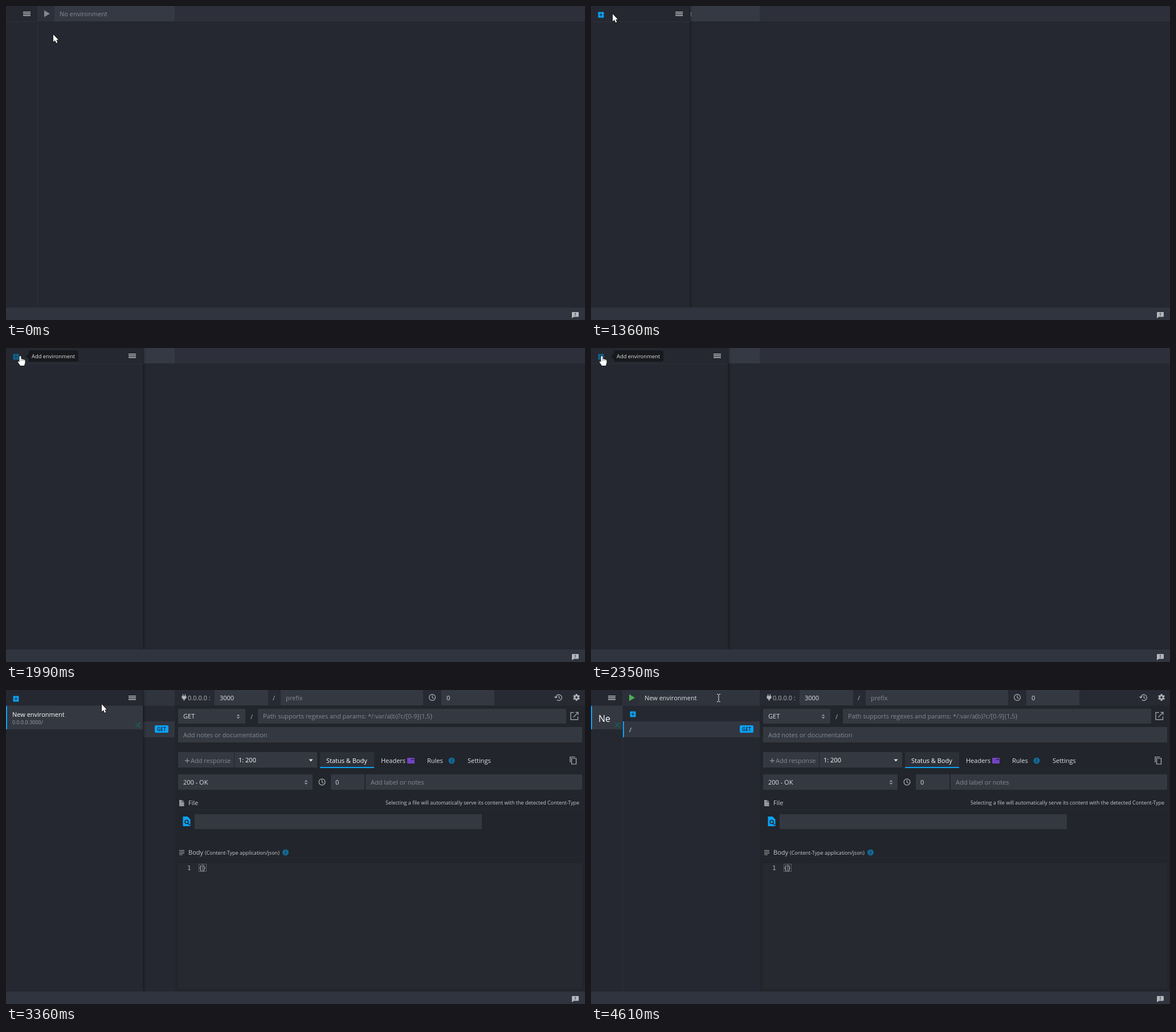
Recreate the animation shown at these times as an HTML page with a canvas. Size 1016 px wide and 551 px high, loop 5.33 s.

```html
<!DOCTYPE html>
<html lang="en">
<head>
<meta charset="utf-8">
<title>Adding an environment</title>
<style>
html, body { margin: 0; width: 100%; height: 100%; overflow: hidden; background: #252830; }
canvas { display: block; }
</style>
</head>
<body>
<canvas id="stage" width="1016" height="551"></canvas>
<script>
const g = document.getElementById('stage').getContext('2d');
const LOOP = 5330, CREATED = 2640;
const BG = '#252830', MAIN = '#22252b', FIELD = '#343841', BLUE = '#0aa2f5', DIM = '#0d6495',
  LIGHT = '#e0e2e6', MUTED = '#858a94', ICON = '#b4b7bc', LINE = '#2e313a';

const clamp = v => Math.max(0, Math.min(1, v));
const ease = v => v < .5 ? 2 * v * v : 1 - 2 * (1 - v) ** 2;

function rect(x, y, w, h, color) {
  g.fillStyle = color;
  g.fillRect(x, y, w, h);
}
function round(x, y, w, h, r, color) {
  g.fillStyle = color;
  g.beginPath();
  g.roundRect(x, y, w, h, r);
  g.fill();
}
// y is the middle of the capital letters
function text(s, x, y, color = LIGHT, size = 11, weight = 400, family = '"Open Sans", "Noto Sans", sans-serif') {
  g.font = `${weight} ${size}px ${family}`;
  g.fillStyle = color;
  g.fillText(s, x, Math.round(y + size * .36));
}
function fillPath(d, x, y, color) {
  g.save();
  g.translate(x, y);
  g.fillStyle = color;
  g.fill(new Path2D(d));
  g.restore();
}
function strokePath(d, x, y, color = ICON, width = 1.2) {
  g.save();
  g.translate(x, y);
  g.strokeStyle = color;
  g.lineWidth = width;
  g.stroke(new Path2D(d));
  g.restore();
}
function circle(x, y, r, color) {
  g.fillStyle = color;
  g.beginPath();
  g.arc(x, y, r, 0, 7);
  g.fill();
}

function plus(x, y, color) {
  round(x - 5, y - 5, 10, 10, 1, color);
  rect(x - 3, y - .5, 6, 1, BG);
  rect(x - .5, y - 3, 1, 6, BG);
}
function burger(x) {
  for (const y of [10, 13, 16]) rect(x - 6, y, 13, 1.4, '#c9cbcf');
}
function clock(x, y) {
  strokePath('M5.4 0A5.4 5.4 0 1 1 -5.4 0A5.4 5.4 0 1 1 5.4 0M0 -3.5V.3L2.6 2', x, y);
}
function info(x, y) {
  circle(x, y, 5.5, '#126a97');
  rect(x - .6, y - 3, 1.2, 1.3, MAIN);
  rect(x - .6, y - 1, 1.2, 4, MAIN);
}
function sorter(x, y) {
  fillPath('M-3 -1L0 -4L3 -1ZM-3 1L0 4L3 1Z', x, y, '#8f939b');
}
function gear(x, y) {
  g.save();
  g.translate(x, y);
  for (let i = 0; i < 6; i++) {
    g.rotate(Math.PI / 3);
    rect(-1.5, -6, 3, 4, ICON);
  }
  circle(0, 0, 4.3, ICON);
  circle(0, 0, 1.9, '#272a32');
  g.restore();
}
function page(x, y, color) {
  fillPath('M-4 -5.5H1.5L4.5 -2.5V5.5H-4Z', x, y, color);
  strokePath('M1.2 -5.5V-2H4.5', x, y, MAIN, .8);
}

function footer() {
  rect(0, 529, 1016, 22, '#30343e');
  round(993, 537, 12, 8.5, 1, ICON);
  fillPath('M0 0H4L0 3Z', 993, 545, ICON);
  rect(998.4, 538.5, 1.2, 3.2, '#30343e');
  rect(998.4, 542.6, 1.2, 1.2, '#30343e');
}

function topBar(created) {
  rect(56, 0, 960, 27, '#2d303b');
  if (created) rect(296, 0, 720, 27, '#272a32');
  fillPath('M-5 -6L5 0L-5 6Z', 72, 13.5, created ? '#4caf50' : '#83868e');
  rect(85, 0, 211, 27, created ? '#30343d' : '#353943');
  text(created ? 'New environment' : 'No environment', 94, 14, created ? LIGHT : MUTED);
}

function routes() {
  rect(56, 27, 240, 1, LINE);
  plus(73.5, 42.5, BLUE);
  rect(56, 55, 240, 28, '#323640');
  rect(56, 55, 2, 28, BLUE);
  text('/', 67, 70);
  round(261, 62, 24, 13, 2, BLUE);
  text('GET', 265, 68.5, '#14202a', 8.5, 600);
}

function content() {
  rect(296, 27, 720, 502, MAIN);

  fillPath('M-2.6 -5.5H-1.2V-2.5H1.2V-5.5H2.6V-2.5H4V0Q4 2.5 1 3V5.5H-1V3Q-4 2.5 -4 0V-2.5H-2.6Z', 312.5, 13, ICON);
  text('0.0.0.0 :', 319, 14, ICON);
  for (const [x, w] of [[366, 94], [482, 250], [764, 93]]) rect(x, 0, w, 27, FIELD);
  text('3000', 375, 14);
  text('/', 468, 14, ICON);
  text('prefix', 491, 14, MUTED);
  clock(748, 13);
  text('0', 773, 14);
  strokePath('M-4.6 0A5.2 5.2 0 1 1 -2.8 4.2M-7 -1.5L-4.6 1L-2.2 -1.5M.8 -3V.4L3 1.8', 969.5, 13);
  gear(1001, 13);

  rect(302, 33, 118, 26, FIELD);
  text('GET', 311, 46.5);
  sorter(407.5, 46.5);
  text('/', 429, 47, ICON);
  rect(442, 33, 541, 26, FIELD);
  text('Path supports regexes and params: */:var/a(b)?c/[0-9]{1,5}', 451, 46.5, MUTED);
  strokePath('M-1 -6H-6.5V6.5H6V1M2 -6.3H6.5V-2M6.3 -6L-2 2.3', 997.5, 45.5, '#9b9ea4', 1.4);
  rect(302, 65, 709, 27, FIELD);
  text('Add notes or documentation', 311, 79, MUTED);

  rect(302, 109, 98, 27, FIELD);
  strokePath('M-4 0H4M0 -4V4', 318, 124, MUTED, 1.4);
  text('Add response', 324, 124, MUTED);
  rect(401, 109, 145, 27, FIELD);
  text('1: 200', 408, 123.5, '#fff');
  fillPath('M-3.5 -2H3.5L0 2Z', 535, 123.5, '#e6e7ea');
  rect(551, 109, 95, 27, '#2c3038');
  rect(551, 135, 95, 2, BLUE);
  text('Status & Body', 562, 124, '#fff');
  text('Headers', 658, 124);
  round(704, 119, 13, 10, 1, '#7443c4');
  rect(711, 121, 5, 2, '#3c2767');
  text('Rules', 739, 124);
  info(782, 124);
  text('Settings', 810, 124);
  strokePath('M-5 3.5V-6H3.5M-2.5 -3.5H5.5V6.5H-2.5Z', 995, 123.5);

  for (const [x, w] of [[302, 236], [570, 59], [631, 380]]) rect(x, 148, w, 27, FIELD);
  text('200 - OK', 311, 162);
  sorter(526.5, 162);
  clock(554.5, 161.5);
  text('0', 578, 162);
  text('Add label or notes', 640, 162, MUTED);

  page(308, 198.5, '#94979e');
  text('File', 320, 198.5, '#c6c9ce');
  text('Selecting a file will automatically serve its content with the detected Content-Type', 666, 197.5, '#c6c9ce', 9);
  rect(302, 209, 709, 1, '#282b32');
  fillPath('M-6 -8.5H2L7 -3.5V8.5H-6Z', 316.5, 230.5, BLUE);
  strokePath('M3.5 1A3 3 0 1 1 -2.5 1A3 3 0 1 1 3.5 1M2.6 3.2L6 6.6', 316.5, 230.5, MAIN, 1.6);
  rect(331, 218, 504, 26, FIELD);

  for (const [y, w] of [[281, 9], [283.5, 9], [286, 9], [288.5, 6]]) rect(304, y, w, 1, '#a3a6ac');
  text('Body', 320, 285, '#c6c9ce');
  text('(Content-Type application/json)', 349, 285.5, '#c6c9ce', 9);
  info(490.5, 285);
  rect(302, 293, 709, 1, '#282b32');

  const mono = '"DejaVu Sans Mono", monospace';
  rect(302, 304, 709, 220, '#262930');
  text('1', 318, 312, '#aeb2b9', 11, 400, mono);
  g.strokeStyle = '#5a5e66';
  g.lineWidth = 1;
  for (const x of [338.5, 345.5]) g.strokeRect(x, 305.5, 6, 13);
  text('{}', 338, 312, '#c5c8c6', 11, 400, mono);
}

// open runs from 0 (narrow strip) to 1 (full drawer)
function drawer(open, created, hover) {
  const w = 56 + 185 * open;
  g.save();
  if (open > 0) {
    g.shadowColor = 'rgba(0,0,0,.55)';
    g.shadowBlur = 5;
  }
  rect(0, 0, w, 529, BG);
  g.restore();
  g.save();
  g.beginPath();
  g.rect(0, 0, w, 529);
  g.clip();
  rect(0, 27, w, 1, LINE);
  rect(w - 1, 0, 1, 529, open > 0 ? '#1d2026' : LINE);
  burger(w - 20);
  if (open > 0) {
    g.globalAlpha = clamp(open * 2);
    plus(17.5, 15.5, hover ? DIM : BLUE);
    g.globalAlpha = 1;
  }
  if (created) {
    rect(0, 28, w - 1, 41, FIELD);
    rect(0, 28, 2, 41, BLUE);
    if (open > .03) {
      text('New environment', 11, 43, '#fff');
      text('0.0.0.0:3000/', 11, 57, '#9a9ea6', 9);
    } else text('Ne', 13, 50, '#fff', 16);
    strokePath('M-4 -3H-2L2 3H4M-4 3H-2L2 -3H4M2.5 -4.5L4 -3L2.5 -1.5M2.5 1.5L4 3L2.5 4.5', w - 10, 61.5, '#12705f', 1);
  }
  g.restore();
}

function tooltip(alpha) {
  g.globalAlpha = alpha;
  round(40, 4, 87, 20, 3, '#17191d');
  fillPath('M0 0L5 -5V5Z', 35, 14.5, '#17191d');
  text('Add environment', 45, 15, LIGHT, 9.4);
  g.globalAlpha = 1;
}

const SHAPES = {
  arrow: 'M0 0V13L3 10.3L5.2 15L7.4 14L5.3 9.5H9Z',
  hand: 'M-1.5 1Q0 -1 1.5 1V5.5Q3 4.5 4 6Q5.5 5.2 6.3 6.8Q8 6 8.5 8V12L7 17H0L-4 11Q-4.5 8.5 -1.5 10.5Z',
};
const TRACK = [
  [370, 83, 50], [820, 46, 26], [910, 42, 20], [1000, 38, 14], [1540, 38, 14], [1720, 35, 12],
  [1900, 26, 14], [1990, 25, 14], [2350, 19, 14], [2890, 19, 14], [3360, 168, 25],
  [3450, 183, 22], [3720, 216, 15], [3810, 220, 14], [LOOP, 220, 14],
];
function pointAt(t) {
  if (t <= TRACK[0][0]) return TRACK[0].slice(1);
  const i = TRACK.findIndex(k => k[0] > t);
  const [t0, x0, y0] = TRACK[i - 1], [t1, x1, y1] = TRACK[i];
  const k = (t - t0) / (t1 - t0);
  return [Math.round(x0 + (x1 - x0) * k), Math.round(y0 + (y1 - y0) * k)];
}
const within = (t, a, b) => t >= a && t < b;

function pointer(t, now) {
  if (now >= 4610) {
    strokePath('M-3 -6.5H-1L0 -5.5L1 -6.5H3M0 -5.5V5.5M-3 6.5H-1L0 5.5L1 6.5H3', 224, 14, '#e8e8e8', 1);
    return;
  }
  if (t >= 4350) return;
  const hand = within(t, 820, 1270) || within(t, 1900, 2980) || within(t, 3720, 4350);
  const [x, y] = pointAt(t), d = SHAPES[hand ? 'hand' : 'arrow'];
  strokePath(d, x, y, '#111', 1.6);
  fillPath(d, x, y, '#fff');
  if (hand) strokePath('M1.5 5V9M4 6V9M6.3 7V9', x, y, '#555', .6);
}

function draw(now) {
  // the screen refreshes every 90 ms
  const phase = now < 3270 ? 10 : 30;
  const t = Math.max(0, Math.floor((now - phase) / 90) * 90 + phase);
  const created = now >= CREATED;
  const open = ease(clamp((t - 1130) / 400)) - ease(clamp((t - 4030) / 400));
  rect(0, 0, 1016, 551, BG);
  topBar(created);
  if (created) {
    routes();
    content();
  }
  drawer(open, created, within(t, 1900, 2980));
  footer();
  if (!created) tooltip(clamp((t - 1810) / 150));
  pointer(t, now);
}

function frame() {
  draw(performance.now() % LOOP);
  requestAnimationFrame(frame);
}
frame();
</script>
</body>
</html>
```
